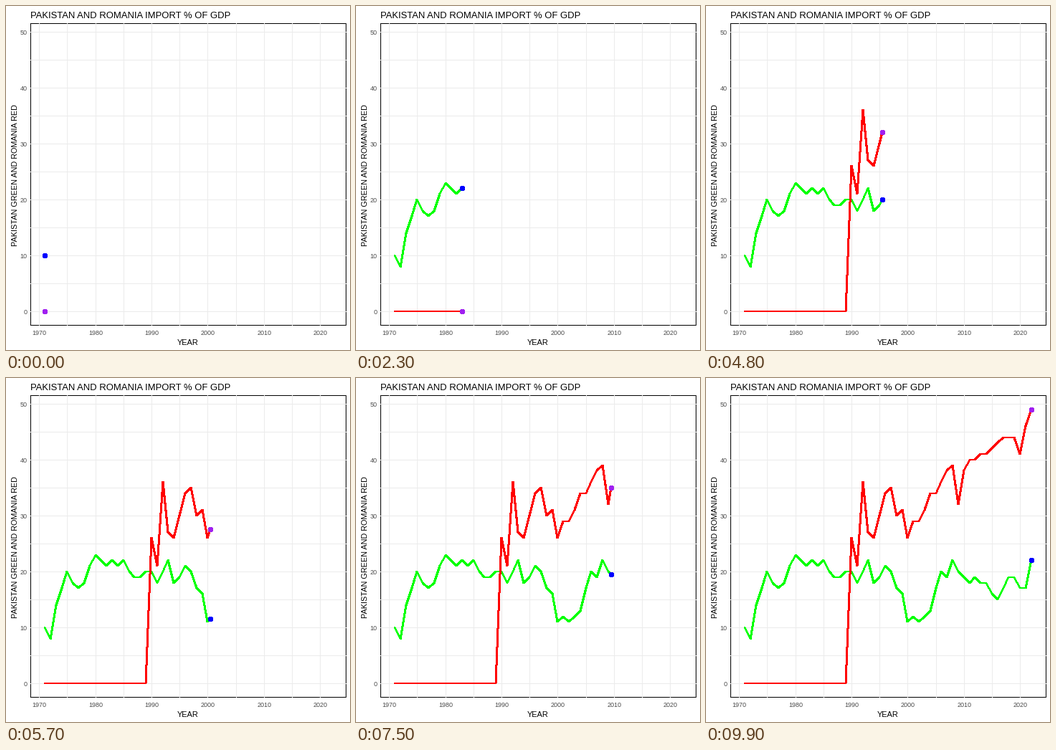
These frames come from a looping animation (480 by 480 pixels, 10 s). A matplotlib script:

```python
import numpy as np
import matplotlib.pyplot as plt
from matplotlib.animation import FuncAnimation
from matplotlib.collections import LineCollection
from matplotlib.patches import Circle

SIZE, FRAMES, INTERVAL = 480, 100, 100
LEFT, RIGHT, TOP, BOTTOM = 34, 474, 24, 445

YEARS = np.arange(1971, 2023)
PAKISTAN = np.array([
    10, 8, 14, 17, 20, 18, 17, 18, 21, 23, 22, 21, 22, 21, 22, 20, 19, 19,
    20, 20, 18, 20, 22, 18, 19, 21, 20, 17, 16, 11, 12, 11, 12, 13, 17, 20,
    19, 22, 20, 19, 18, 19, 18, 18, 16, 15, 17, 19, 19, 17, 17, 22])
ROMANIA = np.array([0] * 19 + [
    26, 21, 36, 27, 26, 30, 34, 35, 30, 31, 26, 29, 29, 31, 34, 34, 36, 38,
    39, 32, 38, 40, 40, 41, 41, 42, 43, 44, 44, 44, 41, 46, 49])

# Every year lands on a whole frame, so a step is a half or a full year.
KEYS = np.round(np.arange(len(YEARS)) * (FRAMES - 1) / (len(YEARS) - 1))


def px(year):
    return np.round(54.0 + 7.84 * (np.asarray(year) - 1971))


def py(value):
    return np.round(426.2 - 7.808 * np.asarray(value))


plt.rcParams["font.family"] = "Liberation Sans"
fig = plt.figure(figsize=(SIZE / 72, SIZE / 72), dpi=72, facecolor="white")
ax = fig.add_axes([0, 0, 1, 1])
ax.set(xlim=(0, SIZE), ylim=(SIZE, 0))
ax.axis("off")


def add_lines(segments, color, width, z, cap="butt"):
    lines = LineCollection(segments, colors=color, linewidths=width,
                           antialiaseds=False, capstyle=cap, zorder=z)
    lines.set_snap(False)
    ax.add_collection(lines, autolim=False)
    return lines


def hline(y):
    return [(LEFT, y + 0.5), (RIGHT + 1, y + 0.5)]


def vline(x):
    return [(x + 0.5, TOP), (x + 0.5, BOTTOM + 1)]


def label(x, y, text, size, color="black", **kw):
    ax.text(x, y, text, fontsize=size, color=color, va="baseline", **kw)


# Panel: the grid runs over the border
add_lines([hline(TOP), hline(BOTTOM), vline(LEFT), vline(RIGHT)], "black", 1, 1)
grid = [vline(px(year)) for year in range(1970, 2021, 5)]
grid += [hline(py(value)) for value in range(0, 51, 5)]
add_lines(grid, "#EBEBEB", 1, 2)

for year in range(1970, 2021, 10):
    label(px(year) + 0.5, 459, str(year), 9, "#4D4D4D", ha="center")
for value in range(0, 51, 10):
    label(29.5, py(value) + 4, str(value), 9, "#4D4D4D", ha="right")
label(34, 17, "PAKISTAN AND ROMANIA IMPORT % OF GDP", 13)
label(254, 473, "YEAR", 11, ha="center")
label(16, 236, "PAKISTAN GREEN AND ROMANIA RED", 10.9, ha="center",
      rotation=90, rotation_mode="anchor")


class Series:
    def __init__(self, values, line_color, dot_color, z):
        self.values = values
        # Slopes of two per year come out thinner
        self.widths = np.where(np.abs(np.diff(values)) == 2, 1.4, 2.0)
        self.lines = add_lines([], line_color, 2, z, "round")
        self.dot = Circle((0, 0), 3.4, fc=dot_color, ec="none", lw=0,
                          antialiased=False, zorder=z + 2)
        ax.add_patch(self.dot)

    def reveal(self, now):
        past = YEARS < now
        value = np.interp(now, YEARS, self.values)
        x = px(np.append(YEARS[past], now))
        y = py(np.append(self.values[past], value))
        pts = np.column_stack([x, y])
        self.lines.set_segments(list(np.stack([pts[:-1], pts[1:]], axis=1)))
        self.lines.set_linewidths(self.widths[:max(len(pts) - 1, 1)])
        self.dot.center = (x[-1] + 0.5, y[-1] + 0.5)


series = [Series(PAKISTAN, "#00FF00", "#0000FF", 3),
          Series(ROMANIA, "#FF0000", "#A020F0", 4)]


def update(frame):
    now = np.interp(frame, KEYS, YEARS)
    for s in series:
        s.reveal(now)
    return []


anim = FuncAnimation(fig, update, frames=FRAMES, interval=INTERVAL,
                     repeat=True, repeat_delay=0, blit=False)
plt.show()
```
